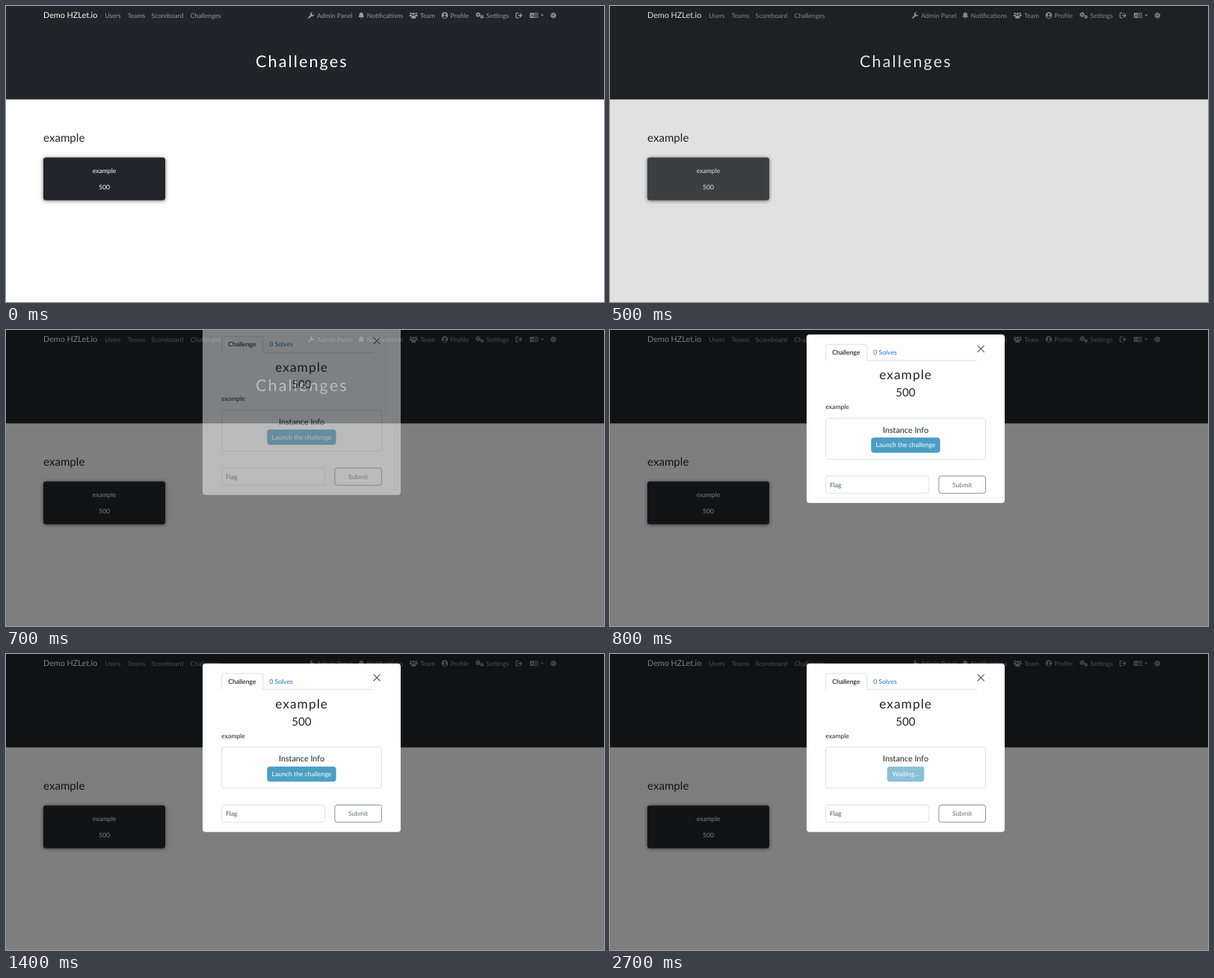
An HTML page for the animation above (8000 ms loop, 800 by 397 pixels).

```html
<!DOCTYPE html>
<html lang="en">
<head>
<meta charset="utf-8">
<title>Challenge launch</title>
<style>
  html, body { margin: 0; width: 100%; height: 100%; overflow: hidden; background: #fefefe; }
  svg { display: block; width: 100%; height: 100%; }
  text { font: 8.64px Lato, sans-serif; fill: #212529; text-rendering: geometricPrecision; }
  .mid { text-anchor: middle; }
  .nav text { fill: #989a9c; }
  .nav .brand { font-size: 10.8px; fill: #fff; }
  .title { font-size: 21.6px; letter-spacing: 2.1px; fill: #fff; }
  .h2 { font-size: 17.28px; letter-spacing: 1.08px; }
  .h3 { font-size: 15.12px; }
  .h5 { font-size: 10.8px; }
  .light text { fill: #fff; }
  .icons { fill: #989a9c; stroke: none; }
  .line { fill: none; stroke: #989a9c; stroke-width: 1.2; stroke-linecap: round; stroke-linejoin: round; }
  .teeth { fill: none; stroke: #989a9c; stroke-dasharray: 1 1; }
  .ring { fill: none; stroke: #989a9c; }
  .box { fill: none; stroke: #d3d8dd; stroke-width: .8; }
  .action { fill: #4b9fc3; stroke: #3a8ecb; stroke-width: .8; }
</style>
</head>
<body>
<svg viewBox="0 0 800 397" preserveAspectRatio="none">
  <defs>
    <filter id="shadow" x="-10%" y="-25%" width="120%" height="150%">
      <feDropShadow dx="0" dy=".6" stdDeviation="2.4" flood-color="#000" flood-opacity=".6"/>
    </filter>
  </defs>

  <rect width="800" height="397" fill="#fefefe"/>
  <rect width="800" height="125.3" fill="#212529"/>

  <g class="nav">
    <text class="brand" x="50" y="16.4">Demo HZLet.io</text>
    <text x="132.3" y="15.6">Users</text>
    <text x="162.5" y="15.6">Teams</text>
    <text x="194.5" y="15.6">Scoreboard</text>
    <text x="246.6" y="15.6">Challenges</text>
    <text x="416" y="15.6">Admin Panel</text>
    <text x="482.7" y="15.6">Notifications</text>
    <text x="554" y="15.6">Team</text>
    <text x="594.6" y="15.6">Profile</text>
    <text x="642.6" y="15.6">Settings</text>
  </g>

  <g class="icons">
    <!-- wrench -->
    <path class="line" style="stroke-width:2" d="M405.2 15.8L409 12"/>
    <path d="M410.6 8.6a2.7 2.7 0 1 0 1.7 2.4l-1.5 1-1.8-.3-.3-1.7z"/>
    <!-- bell -->
    <path d="M475.3 8.2c.4 0 .6.3.6.8 1.5.3 2.2 1.4 2.2 2.8 0 1.500.3 2.100.9 2.700v.6h-7.400v-.6c.6-.6.9-1.200.9-2.700 0-1.400.7-2.500 2.200-2.800 0-.5.2-.8.6-.8zM474.200 15.600h2.200a1.100 1.100 0 0 1-2.200 0z"/>
    <!-- group -->
    <circle cx="541.700" cy="10" r="1.300"/><circle cx="548.700" cy="10" r="1.300"/><circle cx="545.200" cy="10.600" r="1.700"/>
    <path d="M539.700 14v-1.200q0-1 1-1h1.900l.8 1-.8 1.200zM550.700 14v-1.200q0-1-1-1h-1.900l-.8 1 .8 1.200zM542.200 16.700v-1.400q0-2.200 2-2.200h2q2 0 2 2.200v1.400z"/>
    <!-- profile -->
    <circle cx="587" cy="12.600" r="4.300"/>
    <g fill="#212529"><circle cx="587" cy="11.200" r="1.500"/><path d="M584.300 15.300q.3-1.900 1.700-1.900h2q1.400 0 1.700 1.900-2.700 2-5.400 0z"/></g>
    <!-- cogs -->
    <circle class="ring" cx="631.700" cy="11.600" r="1.900" stroke-width="1.500"/>
    <circle class="teeth" cx="631.700" cy="11.600" r="3" stroke-width="1" pathLength="16"/>
    <circle class="ring" cx="636.800" cy="14.400" r="1.300" stroke-width="1.200"/>
    <circle class="teeth" cx="636.800" cy="14.400" r="2.200" stroke-width=".8" pathLength="12"/>
    <!-- sign out -->
    <path class="line" d="M685 9.300h-1.700q-1 0-1 1v4.600q0 1 1 1h1.700M685.200 12.600h4.300M687.600 10.200l2.400 2.400-2.400 2.400"/>
    <!-- language -->
    <rect x="700.800" y="9.200" width="11" height="6.800" rx=".8"/>
    <path d="M702.200 14.500l1.400-3.600 1.400 3.600M702.700 13.500h1.800" fill="none" stroke="#212529" stroke-width=".7"/>
    <path d="M706.300 9.900h4.800v5.400h-4.800z" fill="#212529"/>
    <path d="M707 11.200h3.500M708.700 10.300v.9M707.300 14.500q2.300-1 2.700-3.200M707.500 12.200q.8 1.600 2.700 2.200" fill="none" stroke="#989a9c" stroke-width=".7"/>
    <path d="M715.200 11.500h4.200l-2.100 2.200z"/>
    <!-- theme -->
    <circle class="ring" cx="732.300" cy="12.600" r="2.100" stroke-width="1.600"/>
    <circle class="teeth" cx="732.300" cy="12.600" r="3.500" stroke-width="1.300" pathLength="16"/>
    <circle cx="732.300" cy="12.600" r=".6"/>
  </g>

  <text class="title" x="334" y="82.300">Challenges</text>
  <text class="h3" x="50" y="182.300">example</text>

  <g class="light">
    <rect id="card" x="50" y="203.200" width="163" height="57.300" rx="3.200" filter="url(#shadow)"/>
    <text class="mid" x="131.500" y="224.100">example</text>
    <text class="mid" x="131.500" y="245.500">500</text>
  </g>

  <rect id="backdrop" width="800" height="397"/>

  <g id="modal">
    <rect x="263" y="12.700" width="265" height="226" rx="4" fill="#fefefe"/>
    <path class="box" d="M288.700 47.700V29q0-2.900 2.900-2.900h49.300q2.900 0 2.900 2.900v18.700H491"/>
    <text x="297.200" y="39.900" style="fill:#000">Challenge</text>
    <text x="352.300" y="39.900" style="fill:#1c71cf">0 Solves</text>
    <path d="M492 27.700l8.300 8.300M500.300 27.700l-8.300 8.300" stroke="#555" stroke-width="1.100" stroke-linecap="round"/>
    <text class="h2" x="360.200" y="73">example</text>
    <text class="h3 mid" x="395.500" y="95.600">500</text>
    <text x="288.300" y="112.700">example</text>

    <rect class="box" x="288.700" y="125" width="213.800" height="55" rx="3.200"/>
    <text class="h5 mid" x="395.500" y="144.400">Instance Info</text>
    <g id="launch" class="light">
      <rect class="action" x="349.800" y="151.400" width="91.300" height="19.400" rx="3"/>
      <text class="mid" x="395.500" y="164.100">Launch the challenge</text>
    </g>
    <g id="waiting" class="light" opacity=".65">
      <rect class="action" x="371.200" y="151.400" width="48.600" height="19.400" rx="3"/>
      <text class="mid" x="395.500" y="164.100">Waiting...</text>
    </g>

    <rect class="box" x="288.700" y="202.500" width="138" height="23.200" rx="3.200"/>
    <text x="294" y="217.300" style="fill:#50565b">Flag</text>
    <rect class="box" x="439.900" y="202.500" width="62.600" height="23.200" rx="3.200" style="stroke:#6c757d"/>
    <text class="mid" x="471.200" y="217.300" style="fill:#6c757d">Submit</text>
  </g>
</svg>

<script>
const LOOP = 8000, STEP = 100;
const FADE = 150, SLIDE = 300, DROP = 27;
const HOVER_AT = 250, CLICK_AT = 466, MODAL_AT = 630, WAIT_AT = 1500;

const el = id => document.getElementById(id);
const [card, backdrop, modal, launch, waiting] =
  ['card', 'backdrop', 'modal', 'launch', 'waiting'].map(el);

const ramp = (t, start, length) => Math.min(1, Math.max(0, (t - start) / length));
const mix = (a, b, k) => a.map((v, i) => Math.round(v + (b[i] - v) * k));
const show = (node, on) => node.setAttribute('visibility', on ? 'inherit' : 'hidden');

// CSS ease-out: cubic-bezier(0, 0, .58, 1)
function easeOut(x) {
  let lo = 0, hi = 1;
  for (let i = 0; i < 24; i++) {
    const u = (lo + hi) / 2;
    if (1.74 * u * u * (1 - u) + u ** 3 < x) lo = u; else hi = u;
  }
  return 3 * lo * lo - 2 * lo ** 3;
}

function draw(t) {
  const hover = t < 600 ? ramp(t, HOVER_AT, FADE) : 0;
  card.setAttribute('fill', `rgb(${mix([33, 37, 41], [66, 70, 73], hover)})`);
  backdrop.setAttribute('opacity', ramp(t, CLICK_AT, FADE) * 0.5);

  const slide = easeOut(ramp(t, MODAL_AT, SLIDE));
  modal.setAttribute('opacity', ramp(t, MODAL_AT, FADE));
  modal.setAttribute('transform', `translate(0 ${DROP * (slide - 1)})`);

  show(launch, t < WAIT_AT);
  show(waiting, t >= WAIT_AT);
}

const begin = performance.now();
function tick() {
  const t = (performance.now() - begin) % LOOP;
  draw(Math.floor(t / STEP) * STEP);
  requestAnimationFrame(tick);
}
tick();
</script>
</body>
</html>
```
